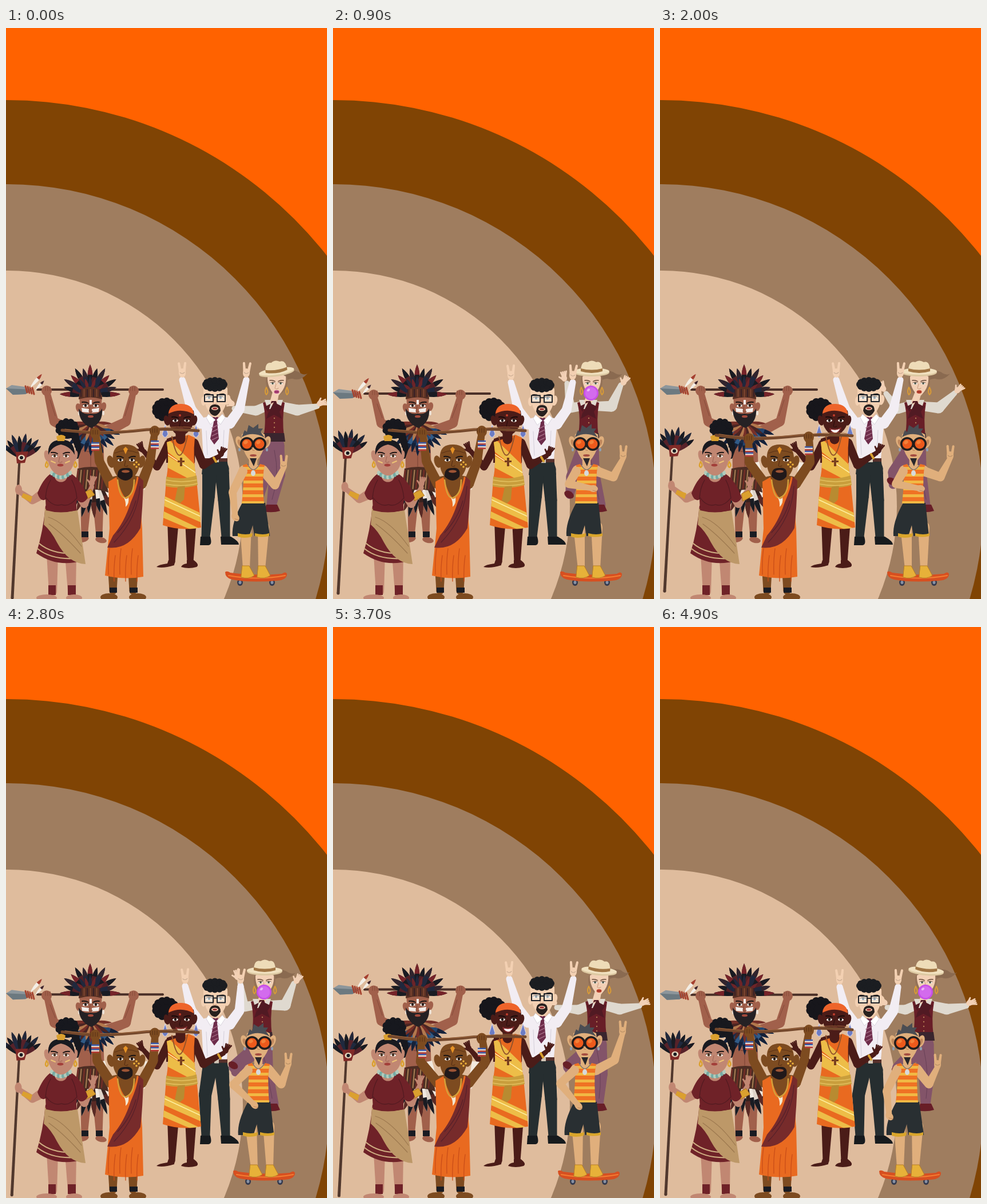
An HTML page with a canvas for the animation above (5000 ms loop, 561x998 px).

```html
<!DOCTYPE html>
<html lang="en">
<head>
<meta charset="utf-8">
<title>Crowd</title>
<style>
html, body { margin: 0; width: 100%; height: 100%; overflow: hidden; background: #ff6200; }
canvas { display: block; width: 561px; height: 998px; }
</style>
</head>
<body>
<canvas></canvas>
<script>
const W = 561, H = 998, LOOP = 5000, STEP = 100, TAU = Math.PI * 2;
const cv = document.querySelector('canvas'), g = cv.getContext('2d');
const dpr = window.devicePixelRatio || 1;
cv.width = W * dpr;
cv.height = H * dpr;

// --- drawing helpers ---
function p(d, fill, line, w = 1) {
  const path = new Path2D(d);
  if (fill) { g.fillStyle = fill; g.fill(path); }
  if (line) { g.strokeStyle = line; g.lineWidth = w; g.stroke(path); }
}
function e(x, y, rx, ry, fill, rot = 0) {
  g.beginPath();
  g.ellipse(x, y, rx, ry, rot * TAU / 360, 0, TAU);
  g.fillStyle = fill;
  g.fill();
}
function box(x, y, w, h, fill) { g.fillStyle = fill; g.fillRect(x, y, w, h); }
function at(x, y, rot, draw) {
  g.save();
  g.translate(x, y);
  g.rotate(rot * TAU / 360);
  draw();
  g.restore();
}
// Tapered limb through points, one width per point.
function limb(pts, ws, fill) {
  for (let i = 0; i < ws.length; i++) {
    const x = pts[2 * i], y = pts[2 * i + 1], r = ws[i] / 2;
    e(x, y, r, r, fill);
    if (i + 1 === ws.length) break;
    const u = pts[2 * i + 2], v = pts[2 * i + 3], q = ws[i + 1] / 2;
    const a = Math.atan2(v - y, u - x) + TAU / 4, c = Math.cos(a), s = Math.sin(a);
    g.beginPath();
    g.moveTo(x + c * r, y + s * r);
    g.lineTo(u + c * q, v + s * q);
    g.lineTo(u - c * q, v - s * q);
    g.lineTo(x - c * r, y - s * r);
    g.fill();
  }
}
function feather(x, y, len, ang, w, fill, tip) {
  at(x, y, ang, () => {
    const leaf = `M0 0Q${len * .65} ${-w} ${len} 0Q${len * .65} ${w} 0 0`;
    p(leaf, fill);
    if (tip) {
      g.save();
      g.clip(new Path2D(leaf));
      box(len * .66, -w, len, 2 * w, tip);
      g.restore();
    }
  });
}
function fan(x, y, n, a0, a1, len, w, fills, tips = []) {
  for (let i = 0; i < n; i++)
    feather(x, y, len * (i % 2 ? .9 : 1), a0 + (a1 - a0) * i / (n - 1), w,
      fills[i % fills.length], tips[i % tips.length]);
}
function curls(x, y, rx, ry, n, r, fill) {
  e(x, y, rx, ry, fill);
  for (let i = 0; i < n; i++) {
    const a = i / n * TAU;
    e(x + rx * Math.cos(a), y + ry * Math.sin(a), r, r, fill);
  }
}
// Eyes, brows, nose and lips around the eye line.
function face(x, y, gap, iris, lip, shade, brow = '#1b1413', s = 1) {
  for (const k of [-1, 1]) {
    const ex = x + k * gap;
    e(ex, y, 5 * s, 2.6 * s, '#f4ece6', k * 6);
    e(ex, y, 2.2 * s, 2.4 * s, iris);
    p(`M${ex - k * 5 * s} ${y - 4 * s}Q${ex} ${y - 7 * s} ${ex + k * 6 * s} ${y - 6 * s}`, null, brow, 1.8 * s);
    p(`M${ex - 5 * s} ${y - 1}Q${ex} ${y - 4 * s} ${ex + 5 * s} ${y - 1}`, null, brow, .9);
  }
  p(`M${x - 1} ${y + 1}l-2 ${9 * s}q2 3 6 0`, null, shade, 1.2);
  if (lip) e(x, y + 16 * s, 5.5 * s, 2.6 * s, lip);
}
// Raised hand with two spread fingers.
function sign(x, y, rot, skin, a, b) {
  at(x, y, rot, () => {
    limb([-3, 0, a, -17], [5, 4], skin);
    limb([3, 0, b, -17], [5, 4], skin);
    e(0, 0, 6, 8, skin);
    p('M-4 -1q4 4 8 0', null, '#0003', 1);
  });
}
function openHand(x, y, rot, skin) {
  at(x, y, rot, () => {
    e(0, 0, 5, 6, skin);
    for (let i = -1; i < 3; i++) limb([i * 1.6, -3, i * 3.2, -11], [3.2, 2.6], skin);
    limb([-3, 1, -8, -4], [3.4, 2.6], skin);
  });
}

// --- motion ---
const KEYS = [0, 900, 2000, 2800, 3700, 4400, 4900];
function track(t, vals) {
  let i = 0;
  while (i < KEYS.length - 2 && t >= KEYS[i + 1]) i++;
  const u = Math.min(1, Math.max(0, (t - KEYS[i]) / (KEYS[i + 1] - KEYS[i])));
  return vals[i] + (vals[i + 1] - vals[i]) * u * u * (3 - 2 * u);
}
const bump = (u, a, b) => u < a || u > b ? 0 : (1 - Math.cos((u - a) / (b - a) * TAU)) / 2;

const ORANGE = '#e96a20', MAROON = '#6f2228', INK = '#191b22';

function backdrop() {
  box(0, 0, W, H, '#ff6200');
  [[710, '#804404'], [563, '#9f7d5f'], [412, '#dfbc9d']].forEach(([r, c]) => e(2, 836, r, r, c));
}

function warrior(t) {
  const S = '#a1604b', D = '#854a39';
  const drop = bump(t % 1000 / 1000, .66, 1) * (t > 4000 ? 17 : 11), y = 632 + drop;
  limb([141, 795, 137, 888], [23, 11], S);
  limb([160, 795, 163, 888], [23, 11], S);
  e(134, 894, 11, 5, S, -15);
  e(166, 895, 10, 5, S, 12);
  box(132, 880, 12, 10, INK);
  box(157, 880, 12, 10, INK);
  p('M126 702Q147 692 170 702L172 785H127Z', S);
  p('M136 738q12 6 25 0M148 712v54', null, D, 1.4);
  fan(149, 775, 10, 54, 126, 82, 10, ['#f0e9e0', '#37211e', '#ded3c8'], [INK, '#5a2a25', INK]);
  p('M125 770Q149 764 173 770L179 812Q150 800 119 815Z', '#4d2d23');
  for (let i = 0; i < 9; i++) p(`M${126 + i * 5.5} 773l-3 32`, null, i % 2 ? '#a78255' : '#7a2d28', 2);

  limb([55, y, 274, y], [4, 4], '#4b3028');
  p(`M0 ${y - 2}L10 ${y - 8}L32 ${y - 5}L48 ${y}L34 ${y + 8}L12 ${y + 9}Z`, '#8d969b');
  p(`M0 ${y - 2}L48 ${y}L34 ${y + 8}L12 ${y + 9}Z`, '#6c7980');
  for (let i = 0; i < 4; i++) p(`M${34 + i * 4} ${y - 6 + i}l3 11`, null, '#a6442f', 3);
  feather(42, y - 3, 32, -49, 6, '#f3eee6', '#a5402f');
  feather(51, y + 1, 23, -47, 5, '#f3eee6', '#40242a');
  for (const k of [-1, 1]) {
    const X = d => 147 + k * d;
    limb([X(31), 704, X(63), 688 + drop * .4, X(75), y + 6], [19, 16, 11], S);
    p(`M${X(61)} ${678 + drop * .5}L${X(70)} ${650 + drop}`, null, D, 1);
    e(X(76), y + 2, 9, 9, S);
    for (let i = 0; i < 3; i++) p(`M${X(70 + i * 4)} ${y - 5}v7`, null, D, 1);
  }
  fan(148, 694, 13, 18, 162, 54, 8, ['#24466f', '#182b4a', '#315b87'], ['#152139']);
  fan(148, 690, 13, 2, 178, 37, 6, ['#773028', '#b3784d', '#4b2523']);
  fan(147, 641, 13, -179, -1, 53, 9, [INK, '#512026', '#20283d'], ['#762329', INK, '#31242d']);
  fan(147, 643, 9, -155, -25, 35, 6, ['#20283d', '#6d2428']);
  e(127, 664, 5, 8, S, -15);
  e(170, 662, 5, 8, S, 15);
  e(128, 673, 2, 4, '#eee3d8');
  e(170, 673, 2, 4, '#eee3d8');
  p('M128 642H168L166 672Q148 702 130 672Z', S);
  p('M127 665Q134 677 148 674Q162 677 168 665Q170 690 149 699Q127 690 127 665Z', '#252124');
  p('M132 664l13 2v6l-12 -1zM163 664l-13 2v6l12 -1zM146 650h4v8h-4z', '#f4eeea');
  face(148, 660, 9, '#30201c', null, D);
  e(148, 679, 5, 2.2, '#a44b3d');
  p('M127 649Q128 626 147 627Q167 626 168 649Q148 642 127 649Z', '#573023');
  for (let i = 0; i < 7; i++) p(`M${131 + i * 5.5} ${632}v12`, null, i % 2 ? '#814631' : '#382026', 2);
}

function hatLady(t) {
  const S = '#f2d0b5', CREAM = '#dfd9cf', V = '#681e27', PLUM = '#835469';
  const x = track(t, [468, 446, 446, 447, 460, 460, 460]);
  const hx = track(t, [473, 452, 453, 452, 465, 465, 465]);
  const lx = track(t, [394, 404, 390, 404, 386, 392, 392]);
  const ly = track(t, [656, 612, 630, 611, 656, 656, 656]);
  const rx = track(t, [549, 508, 520, 508, 541, 541, 541]);
  const ry = track(t, [656, 619, 633, 618, 657, 657, 657]);
  const up = (656 - ly) / 45;
  const lift = track(t, [0, .25, .6, 1, 1, .85, .85]);
  const kx = x - 20 - lift * 26, ky = 790 - lift * 22;
  limb([x - 6, 735, kx, ky, kx - 8 + lift * 8, ky + 38 - lift * 28], [28, 24, 15], PLUM);
  e(kx - 8 + lift * 4, ky + 42 - lift * 44, 9, 6, V, 30);
  limb([x, 730, x + 6, 780, track(t, [464, 468, 464, 468, 464, 464, 464]), 834], [37, 28, 17], PLUM);
  p(`M${x + 1} 738Q${x + 11} 782 465 824`, null, '#684057', 1);
  p('M455 833h19l5 11q-13 4 -29 1z', V);
  // sleeves
  limb([x - 13, 661, x - 31, 669 - up * 5, lx + 5, ly + 9], [16, 17, 9], CREAM);
  limb([x + 13, 661, x + 41, 668 - up * 7, rx - 5, ry + 5], [16, 19, 9], CREAM);
  openHand(lx, ly, -55 + up * 42, S);
  openHand(rx, ry, 70 - up * 44, S);
  p(`M${x - 19} 655Q${x} 647 ${x + 19} 655Q${x + 14} 682 ${x + 18} 715H${x - 18}Q${x - 12} 682 ${x - 19} 655`, V);
  p(`M${x - 18} 708h36l2 15h-39z`, '#39252e');
  for (let i = 0; i < 4; i++) e(x + 1, 682 + i * 8, 1.2, 1.2, '#b27c55');
  p(`M${x - 16} 650h32l-5 16h-22z`, CREAM);
  // hair and head
  const sway = Math.sin(t / 310) * 2;
  p(`M${hx + 9} 604Q${hx + 25} 595 ${hx + 38} ${601 + sway}Q${hx + 47} 608 ${hx + 54} ${604 + sway}Q${hx + 41} 618 ${hx + 28} 613Q${hx + 20} 612 ${hx + 12} 620Z`, '#8a6a50');
  e(hx, 618, 19, 23, '#947258');
  limb([hx - 1, 635, x, 653], [11, 13], S);
  p(`M${hx - 16} 609Q${hx} 600 ${hx + 16} 609Q${hx + 18} 630 ${hx} 645Q${hx - 17} 630 ${hx - 16} 609`, S);
  face(hx, 621, 7, '#4b5748', null, '#d0a487', '#684938', .83);
  e(hx, 636, 4.5, 3, t > 4200 || t < 300 ? '#b44689' : '#c4452d');
  p(`M${hx - 3} 636h6`, null, '#76262a', 1);
  for (const k of [-1, 1]) p(`M${hx + k * 18} 628q-4 8 0 13q5 -4 0 -13`, null, '#d99b36', 2);
  at(hx, 602, track(t, [-8, 0, 0, 0, 5, 5, 5]), () => {
    e(0, 0, 31, 7, '#ddc9a2');
    e(0, -2, 31, 6, '#f1e1bf');
    p('M-19 -4Q-18 -21 -7 -18Q0 -23 8 -18Q18 -21 19 -4Q0 1 -19 -4', '#eedcb8');
    p('M-19 -7Q0 -2 19 -7L19 -2Q0 4 -19 -2Z', '#a17645');
  });
  p(`M${x} 654L${x - 16} 662L${x - 9} 672Z M${x} 654L${x + 16} 662L${x + 9} 672Z M${x - 4} 652h8l10 31l-14 -7l-13 7z`, '#511a23');
  const r = Math.min(1, Math.max(0, ((t + 800) % 2000 - 80) / 500)) * 13 * (((t + 800) % 2000) < 1750 ? 1 : 0);
  const grow = (t + 1000) % 2000;
  const br = grow > 1200 && grow < 2000 ? Math.min(13, (grow - 1200) / 40) : 0;
  if (br > 0) {
    e(hx - 1, 638, br, br, '#c84ee8');
    e(hx - 1, 638, br * .8, br * .8, '#d36bed');
    e(hx - 1 - br * .35, 638 - br * .4, br * .22, br * .15, '#edb2f8', -35);
  }
}

function clerk(t) {
  const S = '#f3d0b2', SHIRT = '#f2edf3', PANTS = '#262e30';
  const b = track(t, [0, .3, 0, .9, 0, 1, 1]), y = b * 4;
  const knee = Math.max(0, b * 1.5 - .5);
  limb([377, 770 + y, 381, 825, 384, 889], [25, 21, 15], PANTS);
  limb([356, 770 + y, 354 - knee * 7, 818, 349, 889], [26, 22, 15], PANTS);
  p(`M345 ${752 + y}h41l4 28h-48z`, PANTS);
  p('M340 889h17q4 14 -3 15h-15zM375 889h18q14 8 14 14h-31z', '#171b1e');
  for (const k of [-1, 1]) {
    const hx = k < 0 ? track(t, [308, 311, 308, 313, 308, 314, 314]) : track(t, [420, 419, 420, 410, 420, 416, 416]);
    const hy = 603 + b * 14;
    limb([366 + k * 25, 691 + y, 366 + k * 42, 667 + y, hx, hy + 12], [19, 17, 11], SHIRT);
    sign(hx, hy, k * 3, S, -5, 6);
  }
  p(`M341 ${683 + y}Q366 ${672 + y} 392 ${683 + y}L386 ${753 + y}H345Z`, SHIRT);
  p(`M350 ${704 + y}l2 42M381 ${703 + y}l-2 43`, null, '#d3ced9', 1);
  box(344, 752 + y, 43, 6, '#57302b');
  box(364, 751 + y, 8, 8, '#d1c5b6');
  p(`M354 ${676 + y}h23l-11 15z`, '#e7bd9d');
  p(`M361 ${680 + y}h10l-2 9l3 29l-8 10l-7 -10l6 -29z`, '#6d2c4a');
  for (let i = 0; i < 4; i++) p(`M360 ${699 + i * 7 + y}l10 -5`, null, '#a06781', 1.6);
  p(`M354 ${675 + y}l12 10l-9 8l-7 -12zM378 ${675 + y}l-10 10l7 8l8 -12z`, '#fff', '#cbc5d0', .7);
  e(345, 652 + y, 4, 8, S);
  e(387, 650 + y, 5, 9, S, 12);
  p(`M345 ${629 + y}Q366 ${620 + y} 387 ${629 + y}Q389 ${669 + y} 366 ${681 + y}Q344 ${669 + y} 345 ${629 + y}`, S);
  curls(365, 623 + y, 16, 7, 12, 6, '#1b1d21');
  face(365, 646 + y, 10, '#677d86', null, '#d3a184');
  g.lineJoin = 'round';
  p(`M347 ${641 + y}h15v12h-15zM369 ${641 + y}h14v12h-14zM362 ${645 + y}h7`, '#ffffff55', '#20242a', 2);
  p(`M355 ${669 + y}Q356 ${657 + y} 365 ${658 + y}Q375 ${657 + y} 375 ${669 + y}Q370 ${678 + y} 365 ${678 + y}Q358 ${677 + y} 355 ${669 + y}`, '#28211f');
  e(365, 665 + y, 6, 3, '#f4cbb1');
  e(365, 665 + y, 4, 1.7, '#9d3031');
}

function skater(t) {
  const S = '#e0af7c', D = '#bf875c';
  const bx = track(t, [437, 451, 451, 451, 447, 437, 437]);
  const x = track(t, [432, 443, 443, 441, 440, 432, 432]);
  const lex = track(t, [396, 412, 412, 397, 397, 396, 396]);
  const ley = track(t, [811, 797, 797, 800, 798, 811, 811]);
  const lhx = track(t, [401, 455, 455, 434, 429, 401, 401]);
  const lhy = track(t, [855, 805, 805, 835, 837, 855, 855]);
  const rex = track(t, [470, 490, 490, 481, 492, 470, 470]);
  const rey = track(t, [799, 785, 785, 799, 757, 799, 799]);
  const rhx = track(t, [485, 507, 507, 493, 506, 485, 485]);
  const rhy = track(t, [765, 748, 748, 763, 707, 765, 765]);
  limb([x - 13, 872, bx - 17, 945], [20, 12], S);
  limb([x + 18, 872, bx + 10, 945], [20, 12], S);
  for (const k of [-28, 28]) {
    e(bx + k, 969, 5, 6, '#34394d');
    e(bx + k, 969, 2.5, 3, '#8791a5');
  }
  p(`M${bx - 54} 951q3 -3 9 1q42 6 90 2q7 -5 9 0q0 11 -18 12q-48 4 -78 -2q-12 -3 -12 -13`, '#d74f20');
  p(`M${bx - 48} 957q50 9 99 0`, null, '#f37d32', 2);
  for (const k of [-18, 10])
    p(`M${bx + k - 6} 940h12l9 17q-10 7 -23 3z`, '#e7b139', '#b67d27', 1);
  const q = x - 443;
  p(`M${x - 24} 830h45l${6 - q * .2} 58q-15 -2 -27 0l-3 -19l-6 19h-${26 - q * .3}q-2 -24 17 -58`, '#292f32');
  p(`M${x - 27} 883q14 4 26 0l-1 6q-14 4 -25 0zM${x - 1 + 4} 883q15 4 25 0v5q-14 3 -25 0z`, '#d9a52b');
  limb([x + 19, 775, rex, rey, rhx, rhy + 4], [17, 15, 9], S);
  at(rhx, rhy, 0, () => sign(0, 0, 2, S, -5, 5));
  const tank = new Path2D(`M${x - 18} 764L${x - 11} 762Q${x} 783 ${x + 12} 762L${x + 20} 764Q${x + 15} 786 ${x + 19} 831H${x - 20}Q${x - 15} 787 ${x - 18} 764`);
  limb([x - 16, 773, x + 17, 773], [18, 18], S);
  box(x - 15, 765, 31, 40, S);
  g.save();
  g.clip(tank);
  box(x - 25, 755, 50, 80, '#ef7224');
  for (let i = 0; i < 6; i++) box(x - 25, 767 + i * 12, 50, 5, '#f1b844');
  g.restore();
  limb([x, 748, x, 766], [15, 14], S);
  p(`M${x - 10} 762Q${x} 782 ${x + 11} 762`, null, '#6c6c70', 1.2);
  e(x, 778, 4, 5, '#d7dadb');
  limb([x - 18, 775, lex, ley, lhx, lhy], [16, 14, 9], S);
  e(lhx, lhy, 8, 6, S, lhx > x ? 8 : 50);
  p(`M${lhx - 1} ${lhy + 3}l7 2`, null, D, 1);
  for (const k of [-1, 1]) {
    e(x + k * 24, 724, 6, 11, S, k * 20);
    e(x + k * 24, 725, 3, 6, D, k * 20);
    e(x + k * 24, 737, 2, 3, '#8fa0b3');
  }
  p(`M${x - 20} 710Q${x} 700 ${x + 20} 710Q${x + 25} 739 ${x} 763Q${x - 23} 740 ${x - 20} 710`, S);
  p(`M${x - 20} 715L${x - 15} 703L${x - 11} 706L${x - 8} 694L${x} 699L${x + 9} 692L${x + 9} 700L${x + 17} 700L${x + 13} 706L${x + 20} 716Q${x} 704 ${x - 20} 715`, '#4b4d53');
  for (const k of [-11, 11]) {
    e(x + k, 727, 12, 12, '#221d1d');
    e(x + k, 727, 8.5, 8.5, '#ed5a1c');
    e(x + k - 2, 724, 4, 3, '#f38039', -35);
  }
  p(`M${x - 2} 733q0 7 4 5`, null, D, 1.2);
  e(x, 747, 6, 2, '#a44c40');
  p(`M${x - 6} 752h12l-5 14z`, '#29272a');
}

function dancer(t) {
  const S = '#4b1c18', D = '#2e100f', Y = '#edbd48';
  const smile = t > 1400 && t < 4100;
  const hx = track(t, [376, 377, 382, 384, 376, 379, 378]);
  const hy = track(t, [744, 743, 738, 740, 738, 738, 742]);
  limb([292, 860, 290, 933], [20, 11], S);
  limb([323, 860, 322, 933], [20, 11], S);
  p('M284 930h11l-1 9q-19 6 -31 3q3 -4 19 -6zM316 930h12q11 8 5 12q-14 4 -27 0q2 -5 10 -6z', S);
  limb([285, 727, 264, 767, 241, 740], [16, 13, 8], S);
  openHand(237, 736, -28, S);
  limb([329, 725, 345, 764, hx - 4, hy + 5], [15, 14, 8], S);
  limb([hx - 13, hy + 7, hx - 9, hy + 14], [4, 4], '#d8a12f');
  openHand(hx, hy, 20, S);
  p('M281 718Q305 708 331 718L330 760H280Z', S);
  const dress = new Path2D('M281 724L319 711L330 716Q326 751 333 790L341 873Q307 880 274 869L280 790Q286 755 281 724');
  g.save();
  g.clip(dress);
  box(265, 700, 90, 190, ORANGE);
  p('M281 716L335 768V782L279 738ZM270 740L335 780V796L270 762ZM270 815L345 850V866L270 833ZM270 842L345 878V886L270 854Z', Y);
  p('M270 821l75 35M281 744l50 33', null, '#fff0a0', 1.5);
  g.restore();
  p('M280 784Q307 791 333 782L335 799Q306 807 279 801Z', '#c99e3c');
  p('M300 802l13 -3l-2 25l-7 7l-9 -5z', '#b88b31');
  p('M280 790q27 6 53 0M279 797q30 6 55 -1', null, '#e3c05f', 1.3);
  curls(279, 667, 17, 14, 13, 7, '#17161b');
  limb([305, 704, 305, 719], [17, 17], S);
  p('M290 714Q303 780 317 713', null, '#93522b', 2);
  box(304, 751, 4, 15, '#79401e');
  box(300, 756, 12, 3, '#79401e');
  for (const k of [-1, 1]) {
    e(305 + k * 24, 686, 5, 9, S, k * 14);
    p(`M${305 + k * 27} 694l-5 16q5 11 10 0z`, '#6c7cc4', '#d7d6ed', 1);
  }
  p('M284 669Q305 652 328 669Q334 701 305 715Q279 701 284 669', S);
  p('M284 674Q286 656 307 657Q327 658 328 675Q306 663 284 674', '#ee642a');
  e(304, 677, 2, 2, '#c43e2d');
  face(306, 686, 10, '#20110e', null, D, '#190b0b');
  if (smile) p('M297 700Q307 704 316 699Q312 709 305 708Q299 707 297 700', '#fff', '#842c2e', 1.8);
  else e(306, 702, 7, 3, '#842c2e');
}

function keeper(t) {
  const S = '#c18772', D = '#a46958', GOLD = '#dba02f';
  const k = (1 - Math.cos(t / 1290 * TAU)) / 2, y = -12 * k, hx = 22 - k * 2;
  limb([81, 920, 82, 985], [20, 14], S);
  limb([113, 920, 115, 985], [20, 14], S);
  box(74, 974, 13, 17, MAROON);
  box(108, 974, 14, 17, MAROON);
  e(71, 996, 18, 6, S);
  e(119, 996, 14, 6, S);
  p('M69 835H123Q127 890 133 931Q90 944 53 918Q65 880 69 835', MAROON);
  p('M55 910Q82 932 132 926M58 901Q83 922 130 918', null, '#cfae82', 2.2);
  p('M68 840Q97 849 125 843L139 937Q109 936 89 899Q79 879 66 868Z', '#bd9868');
  p('M75 867Q100 885 130 918M74 855Q101 863 132 906', null, '#9b774e', 1.2);
  limb([24 - k * 2, 745 + y, 11 - k * 3, 996 + y], [4, 5], '#51382d');
  const sx = 27 - k * 2, sy = 754 + y;
  fan(sx, sy, 8, -142, -34, 46, 8, [INK, '#572229', '#1f293e'], ['#22283a', INK]);
  p(`M${sx - 10} ${sy - 13}L${sx + 12} ${sy - 14}L${sx + 6} ${sy + 6}L${sx - 8} ${sy + 7}Z`, '#812a27');
  e(sx, sy - 3, 6, 5, '#e5d4bb');
  e(sx, sy - 3, 3, 3, INK);
  limb([66, 813, 46, 826 + y * .25, hx, 809 + y * .6], [18, 13, 8], S);
  e(hx, 807 + y * .6, 6, 9, S);
  p(`M30 ${813 + y * .5}l16 6l-3 10l-16 -9z`, GOLD);
  const rx = 150 + k * 7, ry = 797 + k * 2;
  limb([127, 812, 137, 832, rx, ry + 5], [18, 14, 8], S);
  p(`M${rx - 14} ${ry + 15}l12 -6l7 10l-17 9z`, GOLD, '#ae731d', 1);
  openHand(rx, ry - 2, 8, S);
  p('M78 779Q96 788 114 779Q132 790 143 821Q134 835 124 825L122 843Q96 850 70 843L69 824Q60 829 55 813Q64 789 78 779', MAROON);
  p('M70 821Q82 838 97 833Q111 838 124 821M78 790q-8 13 -9 33M115 790q7 13 9 32', null, '#501a20', 1.2);
  curls(107, 700, 15, 12, 11, 6, '#17181e');
  limb([119, 708, 127, 735, 124, 750], [15, 10, 6], '#17181e');
  limb([95, 768, 96, 782], [20, 23], S);
  for (let i = 0; i < 9; i++) e(80 + i * 4, 778 + Math.sin(i / 8 * Math.PI) * 7, 3, 4, i % 2 ? '#75aba4' : '#b2cbbb');
  for (const s of [-1, 1]) {
    e(96 + s * 24, 748, 5, 10, S, s * 14);
    p(`M${96 + s * 25} 758q-4 8 0 10q5 -3 0 -10`, null, GOLD, 2.5);
  }
  p('M74 735Q96 714 119 735Q124 766 107 778Q96 787 84 777Q69 762 74 735', S);
  p('M74 746Q72 721 94 720Q120 717 120 746Q112 731 96 728Q80 731 74 746', '#191a20');
  p('M88 714q9 -6 16 0l-2 8h-12z', GOLD);
  face(95, 748, 10, '#4d3421', '#a33f3a', D);
  p('M79 757l7 3M104 760l7 -3', null, '#ecc175', 2);
}

function elder(t) {
  const S = '#7d4b20', D = '#593016';
  const d = bump(t % 833.3 / 833.3, .27, .75) * 18, ly = 708 + d, ry = 705 + d;
  limb([187, 950, 187, 984], [17, 13], S);
  limb([222, 950, 222, 984], [17, 13], S);
  box(181, 978, 13, 9, INK);
  box(216, 978, 14, 9, INK);
  e(180, 995, 15, 7, S);
  e(230, 995, 15, 7, S);
  p('M163 760l10 -2l9 35l-3 16zM257 760l-14 -1l-6 35l5 14z', '#f2eadf');
  limb([183, 797, 163 - d * .7, 757 + d * .2, 157 - d * .2, ly + 2], [18, 16, 12], S);
  limb([237, 797, 252 + d, 757 + d * .2, 260 + d * .1, ry + 2], [18, 16, 12], S);
  p('M181 786Q210 776 240 786L238 822H181Z', S);
  p('M179 793L193 785Q202 817 211 823Q224 810 229 784L240 791Q234 838 238 874L240 959Q207 965 173 957L181 875Z', ORANGE);
  for (let i = 0; i < 6; i++) p(`M${181 + i * 10} ${910 + i % 2 * 12}q-3 20 -2 45`, null, '#c94d18', 1.3);
  p('M232 784L240 791Q239 839 235 874Q213 913 177 908L187 887Q207 864 218 829Q229 805 232 784', '#772b2b');
  p('M234 801Q231 855 189 899M227 826Q218 858 195 882', null, '#55202a', 1.2);
  p('M195 790Q199 824 210 821Q224 815 224 790', null, '#d5a13a', 2.5);
  p('M205 819q6 8 9 1q2 11 -5 17q1 -10 -4 -18', '#f4e6cf');
  e(183, 758, 6, 11, S, -16);
  e(237, 758, 6, 11, S, 16);
  p('M187 746Q189 727 211 728Q233 729 234 750Q236 778 216 791Q205 795 195 784Q184 771 187 746', S);
  p('M190 743q20 -9 41 0', null, D, 1);
  face(210, 755, 10, '#21140e', null, D);
  p('M195 784Q194 768 209 769Q224 767 221 784Q210 798 195 784', '#21191a');
  e(209, 775, 7, 2.5, '#9d5435');
  p('M205 736l4 -4l4 4l-4 9z', '#e69225');
  for (const [a, b] of [[-4, 0], [4, 0], [0, -4], [0, 4]]) e(228 + a, 763 + b, 1.8, 1.8, '#f0b33b');
  p(`M98 ${703 + d * .85}Q133 ${706 + d} 159 ${708 + d}Q203 ${707 + d} 246 ${702 + d}Q286 ${700 + d} 336 ${704 + d * .85}`, null, '#74482c', 5);
  p(`M103 ${701 + d * .85}Q160 ${709 + d} 246 ${701 + d}T332 ${702 + d}`, null, '#a2683d', 1);
  for (const [x, y] of [[156, ly], [260, ry]]) {
    e(x, y, 9, 10, S);
    for (let i = -2; i < 2; i++) p(`M${x + i * 4} ${y - 5}v7`, null, D, 1);
    ['#385bad', '#e5d8d0', '#b83c36', '#385bad', '#e5d8d0', '#b83c36'].forEach((c, i) =>
      box(x - 7, y + 16 + i * 2.5, 14, 2.5, c));
  }
}

function draw(t) {
  g.setTransform(dpr, 0, 0, dpr, 0, 0);
  g.lineCap = 'round';
  g.lineJoin = 'round';
  backdrop();
  for (const part of [warrior, hatLady, clerk, skater, dancer, keeper, elder]) part(t);
}

let last = -1;
function tick() {
  const t = Math.floor(performance.now() % LOOP / STEP) * STEP;
  if (t !== last) draw(last = t);
  requestAnimationFrame(tick);
}
tick();
</script>
</body>
</html>
```
